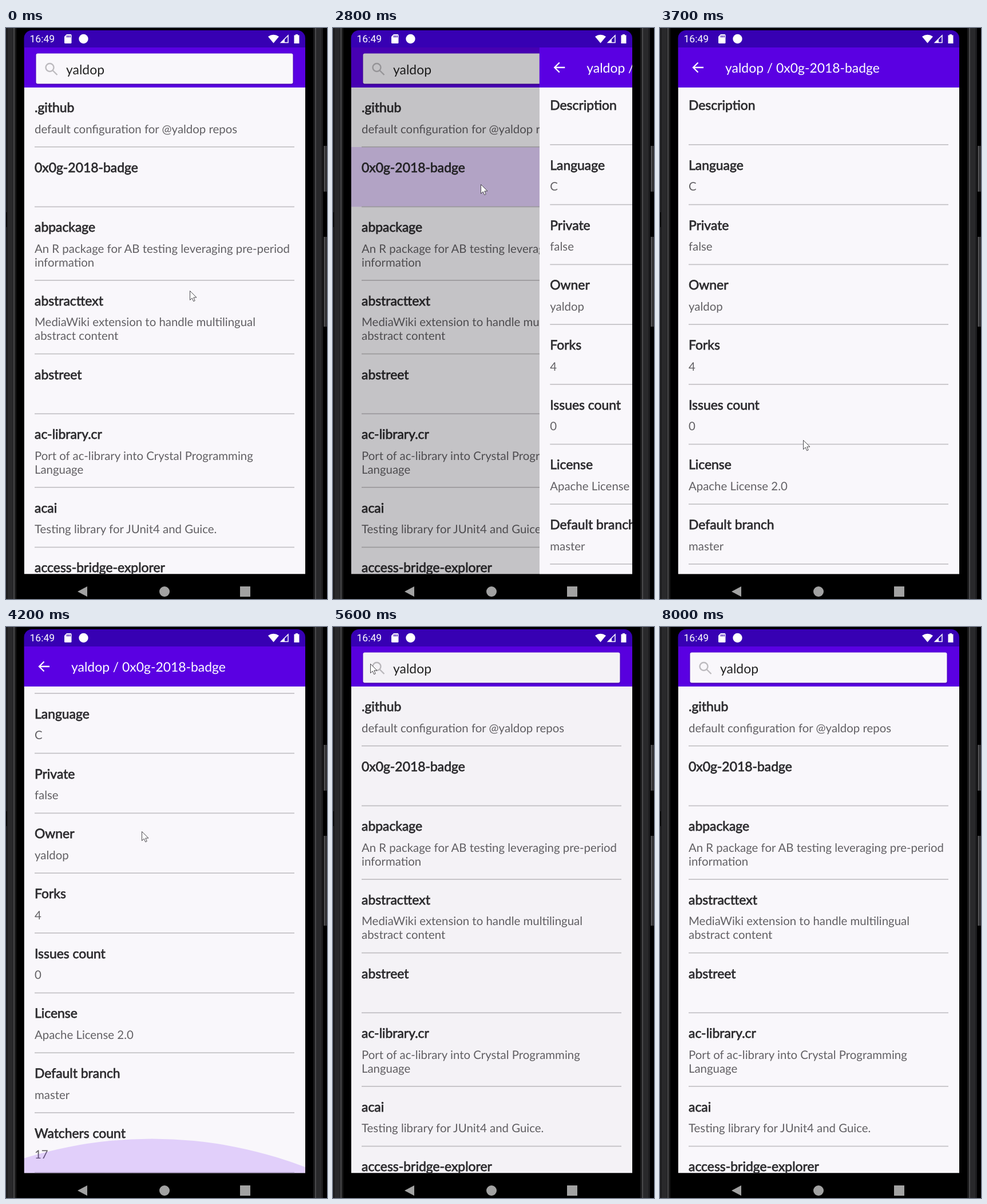
Animation of 561 by 998 pixels, one loop 9200 ms. Source, as an HTML page with a canvas:

```html
<!DOCTYPE html>
<html lang="en">
<head>
<meta charset="utf-8">
<title>Repository browser</title>
<style>
  html, body { margin: 0; width: 100%; height: 100%; overflow: hidden; background: #000; }
  canvas { display: block; }
</style>
</head>
<body>
<canvas id="stage" width="561" height="998"></canvas>
<script>
const ctx = document.getElementById('stage').getContext('2d');
ctx.textRendering = 'geometricPrecision';

const LOOP = 9200, STEP = 100;
const SCREEN = { x: 31.5, y: 4, w: 491.5, bottom: 954.5 };
const ROW = 104.71, LINE = 23.84, SCROLL_MAX = 88;
const PAPER = '#f9f7fb', PURPLE = '#5a00e2';
const TITLE_FONT = '22.9px Lato, sans-serif';
const BODY_FONT = '20.4px Lato, sans-serif';
const OWNER = 'yaldop', REPO = '0x0g-2018-badge';

const repos = [
  ['.github', `default configuration for @${OWNER} repos`],
  [REPO],
  ['abpackage', 'An R package for AB testing leveraging pre-period', 'information'],
  ['abstracttext', 'MediaWiki extension to handle multilingual', 'abstract content'],
  ['abstreet'],
  ['ac-library.cr', 'Port of ac-library into Crystal Programming', 'Language'],
  ['acai', 'Testing library for JUnit4 and Guice.'],
  ['access-bridge-explorer'],
];
const details = [
  ['Description'], ['Language', 'C'], ['Private', 'false'], ['Owner', OWNER],
  ['Forks', '4'], ['Issues count', '0'], ['License', 'Apache License 2.0'],
  ['Default branch', 'master'], ['Watchers count', '17'],
];

// Each key is time, x, y.
const pointerKeys = [
  [0, 321, 459], [300, 290, 300], [700, 285, 724], [1000, 252, 145],
  [1400, 290, 516], [1500, 290, 516], [1600, 277, 455], [2000, 258, 273],
  [3400, 258, 273], [3700, 250, 720], [4200, 237, 357], [4400, 230, 330],
  [4900, 65, 64], [5600, 65, 64], [6000, 99, 202], [7000, 512, 956],
];

const clamp = v => Math.max(0, Math.min(1, v));
const progress = (t, from, to) => clamp((t - from) / (to - from));
const smooth = p => p * p * (3 - 2 * p);
const pulse = (t, start, peak, end) => progress(t, start, peak) * (1 - progress(t, peak, end));

function rect(x, y, w, h, color) {
  ctx.fillStyle = color;
  ctx.fillRect(x, y, w, h);
}

function disc(x, y, r, color) {
  ctx.fillStyle = color;
  ctx.beginPath();
  ctx.arc(x, y, r, 0, 7);
  ctx.fill();
}

function shape(path, fill, stroke, width = 1) {
  const p = new Path2D(path);
  if (fill) { ctx.fillStyle = fill; ctx.fill(p); }
  if (stroke) { ctx.strokeStyle = stroke; ctx.lineWidth = width; ctx.stroke(p); }
}

function text(str, x, y, font, color, embolden = 0) {
  ctx.font = font;
  ctx.fillStyle = ctx.strokeStyle = color;
  ctx.fillText(str, x, y);
  if (embolden) {
    ctx.lineWidth = embolden;
    ctx.strokeText(str, x, y);
  }
}

function clipped(x, y, w, h, draw) {
  ctx.save();
  ctx.beginPath();
  ctx.rect(x, y, w, h);
  ctx.clip();
  draw();
  ctx.restore();
}

function rows(items, top) {
  for (const [title, ...lines] of items) {
    text(title, 50, top + 44, TITLE_FONT, '#2d2c2f', 0.75);
    lines.forEach((line, i) => text(line, 50, top + 80.5 + i * LINE, BODY_FONT, '#626064'));
    top += ROW + Math.max(0, lines.length - 1) * LINE;
    rect(50, top - 0.8, 454, 1.7, '#c3c1c5');
  }
}

// Overscroll glow: a shallow arc reaching in from an edge.
function glow(edge, direction, strength) {
  if (!strength) return;
  const radius = 750, depth = 60 * strength;
  disc(255, edge + direction * (depth - radius), radius, `rgba(98,0,238,${0.16 * strength})`);
}

function body(draw) {
  clipped(SCREEN.x, 104, SCREEN.w, SCREEN.bottom - 104, draw);
}

function listPage(t) {
  rect(SCREEN.x, 34, SCREEN.w, 70, PURPLE);
  ctx.save();
  ctx.shadowColor = 'rgba(0,0,0,.35)';
  ctx.shadowBlur = 3;
  ctx.shadowOffsetY = 1;
  ctx.fillStyle = PAPER;
  ctx.beginPath();
  ctx.roundRect(52.5, 44.5, 449, 53, 3);
  ctx.fill();
  ctx.restore();
  ctx.lineCap = 'butt';
  shape('M83.5 69 a7 7 0 1 1 -14 0 a7 7 0 1 1 14 0 M81.5 74 L89.5 82', null, '#bdbbbf', 2.4);
  text(OWNER, 105, 81, TITLE_FONT, '#222');
  body(() => {
    rect(SCREEN.x, 104, SCREEN.w, 851, PAPER);
    if (t >= 2000 && t < 3400) {
      rect(SCREEN.x, 208, SCREEN.w, 104.5, `rgba(98,0,238,${0.16 * progress(t, 1900, 2300)})`);
    }
    rows(repos, 103);
    glow(104, 1, pulse(t, 300, 700, 1000));
  });
}

function detailPage(t) {
  rect(SCREEN.x, 34, SCREEN.w, 70, PURPLE);
  if (t >= 5100) {
    rect(SCREEN.x, 34, 70, 70, `rgba(255,255,255,${0.18 * progress(t, 5000, 5300)})`);
  }
  shape('M76 69 H58.5 M66.5 60.5 L58 69 L66.5 77.5', null, '#fff', 2.3);
  text(`${OWNER} / ${REPO}`, 114, 78, TITLE_FONT, '#fff');
  body(() => {
    rect(SCREEN.x, 104, SCREEN.w, 851, PAPER);
    rows(details, 99.2 - SCROLL_MAX * smooth(progress(t, 3700, 4000)));
    glow(SCREEN.bottom, -1, pulse(t, 3900, 4200, 4800));
  });
}

// Horizontal position of the detail page: 0 is in place, 1 is off screen.
function detailOffset(t) {
  if (t < 2800) return 1;
  if (t < 5300) return (1 - progress(t, 2720, 3360)) ** 3;
  return smooth(progress(t, 5340, 5630));
}

function bezel() {
  rect(0, 0, 561, 998, '#000');
  rect(0, 0, 13, 998, '#1d1d1f');
  rect(3, 0, 9, 998, '#29292b');
  rect(13, 0, 2, 998, '#4a4a4c');
  rect(15, 0, 3, 998, '#1b1b1c');
  rect(537, 0, 3, 998, '#1b1b1c');
  rect(540, 0, 2, 998, '#4a4a4c');
  rect(542, 0, 12, 998, '#29292b');
  rect(551, 0, 3, 998, '#1d1d1f');
  for (const [y, h] of [[206, 80], [365, 157]]) {
    rect(555, y, 6, h, '#303032');
    rect(556, y, 1.5, h, '#59595b');
  }
  rect(0, 322, 1.5, 26, '#000');
}

function systemBars() {
  ctx.fillStyle = '#3700b3';
  ctx.beginPath();
  ctx.roundRect(SCREEN.x, SCREEN.y, SCREEN.w, 30, [14, 14, 0, 0]);
  ctx.fill();
  text('16:49', 41.5, 25.3, '17.5px Roboto, sans-serif', '#fff');
  shape('M106 11 H113 Q114.5 11 114.5 12.5 V25.5 Q114.5 27 113 27 H103.5 Q102 27 102 25.5 V15 Z', '#fff');
  for (const x of [106, 108.7, 111.4]) rect(x, 13, 1.4, 3.5, '#3700b3');
  disc(135.5, 19, 8.2, '#fff');
  shape('M458 15 Q467.5 8.5 477 15 L467.5 26.5 Z', '#fff');
  shape('M493 13 V25.5 H480.5 Z', null, '#fff', 1.5);
  shape('M487 19 V26 H480 Z', '#fff');
  shape('M506 11 H510 V12.5 H512.5 V27 H503.5 V12.5 H506 Z', '#fff');

  shape('M142 976 V994 L125 985 Z', '#a2a2a2');
  disc(277, 985, 9, '#a2a2a2');
  rect(409, 976, 18, 18, '#a2a2a2');
}

function pointer(t) {
  if (t > 7000) return;
  const next = Math.max(1, pointerKeys.findIndex(key => key[0] >= t));
  const [t0, x0, y0] = pointerKeys[next - 1];
  const [t1, x1, y1] = pointerKeys[next];
  const p = progress(t, t0, t1);
  ctx.save();
  ctx.translate(x0 + (x1 - x0) * p, y0 + (y1 - y0) * p);
  shape('M.5 .5 V16.5 L4.2 13 L6.7 18.7 L9.2 17.6 L6.8 12 H12 Z', '#fff', '#38363c', 0.9);
  ctx.restore();
}

function draw(t) {
  bezel();
  clipped(SCREEN.x, SCREEN.y, SCREEN.w, SCREEN.bottom - SCREEN.y, () => {
    const offset = detailOffset(t);
    listPage(t);
    rect(SCREEN.x, 34, SCREEN.w, 921, `rgba(0,0,0,${0.64 * (1 - offset)})`);
    if (offset < 0.95) {
      ctx.translate(offset * SCREEN.w, 0);
      detailPage(t);
    }
  });
  systemBars();
  pointer(t);
}

function tick(now) {
  draw(Math.floor((now % LOOP) / STEP) * STEP);
  requestAnimationFrame(tick);
}
requestAnimationFrame(tick);
</script>
</body>
</html>
```
